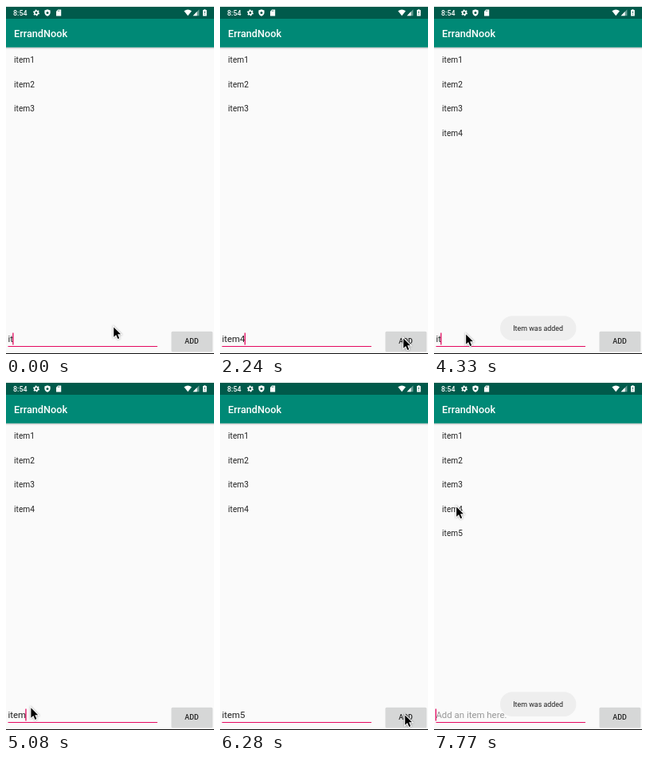
Write an HTML page that moves like this. It is 261 px wide and 436 px high and loops after 8000 ms.

```html
<!DOCTYPE html>
<html lang="en">
<head>
<meta charset="utf-8">
<title>To-do list</title>
<style>
  html, body { margin: 0; width: 100%; height: 100%; overflow: hidden; background: #fafafa; }
  svg { display: block; width: 100%; height: 100%; font-family: Roboto, sans-serif; fill: #212121; }
  .white { fill: #fff; }
  .medium { font-weight: 500; }
  .accent { fill: #e4085f; }
  .list { font-size: 10.16px; }
  .field { font-size: 11.43px; }
  .small { font-size: 8.89px; }
  .middle { text-anchor: middle; }
  #cursor { filter: drop-shadow(0 .8px .8px #0006); }
</style>
</head>
<body>
<svg viewBox="0 0 261 436">
  <linearGradient id="shade" x2="0" y2="1">
    <stop stop-opacity=".22"/>
    <stop offset="1" stop-opacity="0"/>
  </linearGradient>
  <rect width="261" height="436" fill="#fafafa"/>
  <rect y="51.8" width="261" height="2.6" fill="url(#shade)"/>
  <rect y="1" width="261" height="50.8" fill="#008976"/>
  <rect y="1" width="261" height="15" fill="#005a4b"/>

  <g class="white">
    <text class="small medium" x="9" y="11.8">8:54</text>
    <g transform="translate(38 8.5)" fill="none" stroke="#fff">
      <circle r="2.2" stroke-width="1.6"/>
      <circle r="3.3" stroke-width="1.4" stroke-dasharray="1.7 1.755"/>
    </g>
    <path d="M52 4.2L55.6 5.6V8.3Q55.4 11.4 52 12.8Q48.6 11.4 48.4 8.3V5.6Z"/>
    <circle cx="52" cy="8.4" r="1.5" fill="#005a4b"/>
    <path d="M65.2 4.6H69.2V12.4H63V6.8Z"/>
    <path d="M65.5 5.5V7M67 5.5V7" stroke="#005a4b" stroke-width=".6"/>
    <path d="M223.4 6.3Q228.2 2.9 233 6.3L228.2 12.3Z"/>
    <path d="M242.4 4.2V12.3H234.6Z" opacity=".4"/>
    <path d="M239.6 7.1V12.3H234.6Z"/>
    <path d="M248.3 4.2H250.5V5H251.8V12.4H247V5H248.3Z"/>
    <path d="M249.4 6.6V8.9M249.4 9.8V10.7" stroke="#005a4b" stroke-width=".9"/>
    <text class="medium" x="10" y="38.9" font-size="12.7">ErrandNook</text>
  </g>

  <g id="list" class="list"></g>

  <rect class="accent" x="2.5" y="426" width="187.5" height="1"/>
  <text id="hint" class="field" x="2.4" y="421.2" fill="#979797">Add an item here:</text>
  <text id="entry" class="field" x="2.4" y="421.2"></text>
  <rect id="caret" class="accent" y="409.5" width="1.3" height="15"/>

  <rect x="207.4" y="407.8" width="52" height="25.6" rx="1.6" fill="#000" opacity=".13"/>
  <rect id="button" x="208" y="408" width="50.8" height="24.2" rx="1.3"/>
  <text class="small medium middle" x="233.1" y="423.2">ADD</text>

  <rect y="435" width="261" height="1" fill="#111"/>

  <g id="toast">
    <rect x="83" y="388.3" width="95.4" height="30.8" rx="15.4" fill="#eee"/>
    <text class="small middle" x="130.6" y="407.2">Item was added</text>
  </g>

  <path id="cursor" d="M1.2 1.4V13.8L4.1 11.1L6.3 16L8.2 15.2L6.1 10.3H10Z"
        fill="#000" stroke="#fff" stroke-width="2" paint-order="stroke"/>
</svg>

<script>
const LOOP = 8000;
const TICK = 149.5;   // the screen refreshes once per tick
const ROUND = 29;     // ticks from one new item to the next
const ADD_AT = 17;    // tick of the ADD click within a round
const BLINK = 3.2;    // ticks the caret stays on or off

const byId = id => document.getElementById(id);
const [list, hint, entry, caret, button, toast, cursor] =
  ["list", "hint", "entry", "caret", "button", "toast", "cursor"].map(byId);

// Pointer moves: start tick, end tick, destination
const home = { x: 134, y: 401 };
const moves = [
  { from: 10, to: 15, x: 229, y: 415 },
  { from: 15, to: 20, x: 225, y: 416 },
  { from: 20, to: 26, x: 39, y: 410 },
  { from: 33, to: 36, x: 5, y: 398 },
  { from: 37, to: 42, x: 231, y: 416 },
  { from: 46, to: 50, x: 27, y: 155 },
];

const clamp = v => Math.min(1, Math.max(0, v));
const smooth = k => k * k * (3 - 2 * k);

function pointerAt(tick) {
  let { x, y } = home;
  for (const move of moves) {
    const k = smooth(clamp((tick - move.from) / (move.to - move.from)));
    x += (move.x - x) * k;
    y += (move.y - y) * k;
  }
  return [x, y];
}

const items = Array.from({ length: 5 }, (_, i) => {
  const item = document.createElementNS(list.namespaceURI, "text");
  item.setAttribute("x", 10.1);
  item.setAttribute("y", 71.2 + i * 30.45);
  item.textContent = "item" + (i + 1);
  return list.appendChild(item);
});

function show(element, visible) {
  element.style.visibility = visible ? "visible" : "hidden";
}

function draw() {
  const tick = Math.floor((performance.now() % LOOP + 8) / TICK);
  const round = Math.floor(tick / ROUND);
  const phase = tick % ROUND;
  const added = phase >= ADD_AT;

  // Each round types "it", "e", "m", then the item's number after a pause.
  const keys = [0, 2, 3, 6 + 4 * round].filter(at => at <= phase);
  const text = added ? "" : `item${4 + round}`.slice(0, 1 + keys.length);
  entry.textContent = text;
  show(hint, !text);

  // The caret restarts its blinking at every edit.
  const lastEdit = added ? ADD_AT : keys.at(-1);
  show(caret, Math.floor((phase - lastEdit + .5) / BLINK) % 2 === 0);
  caret.setAttribute("x", 1.7 + (text ? entry.getComputedTextLength() : 0));

  const count = 3 + round + added;
  items.forEach((item, i) => show(item, i < count));

  const sinceAdd = tick < ADD_AT ? Infinity : (tick - ADD_AT) % ROUND;
  toast.setAttribute("opacity", clamp(Math.min(sinceAdd + 1, 15 - sinceAdd) / 2));
  button.setAttribute("fill", Math.abs(phase - ADD_AT) < 2 && phase <= ADD_AT ? "#c8c9c9" : "#d6d7d7");
  cursor.setAttribute("transform", `translate(${pointerAt(tick)})`);
  requestAnimationFrame(draw);
}
draw();
</script>
</body>
</html>
```
